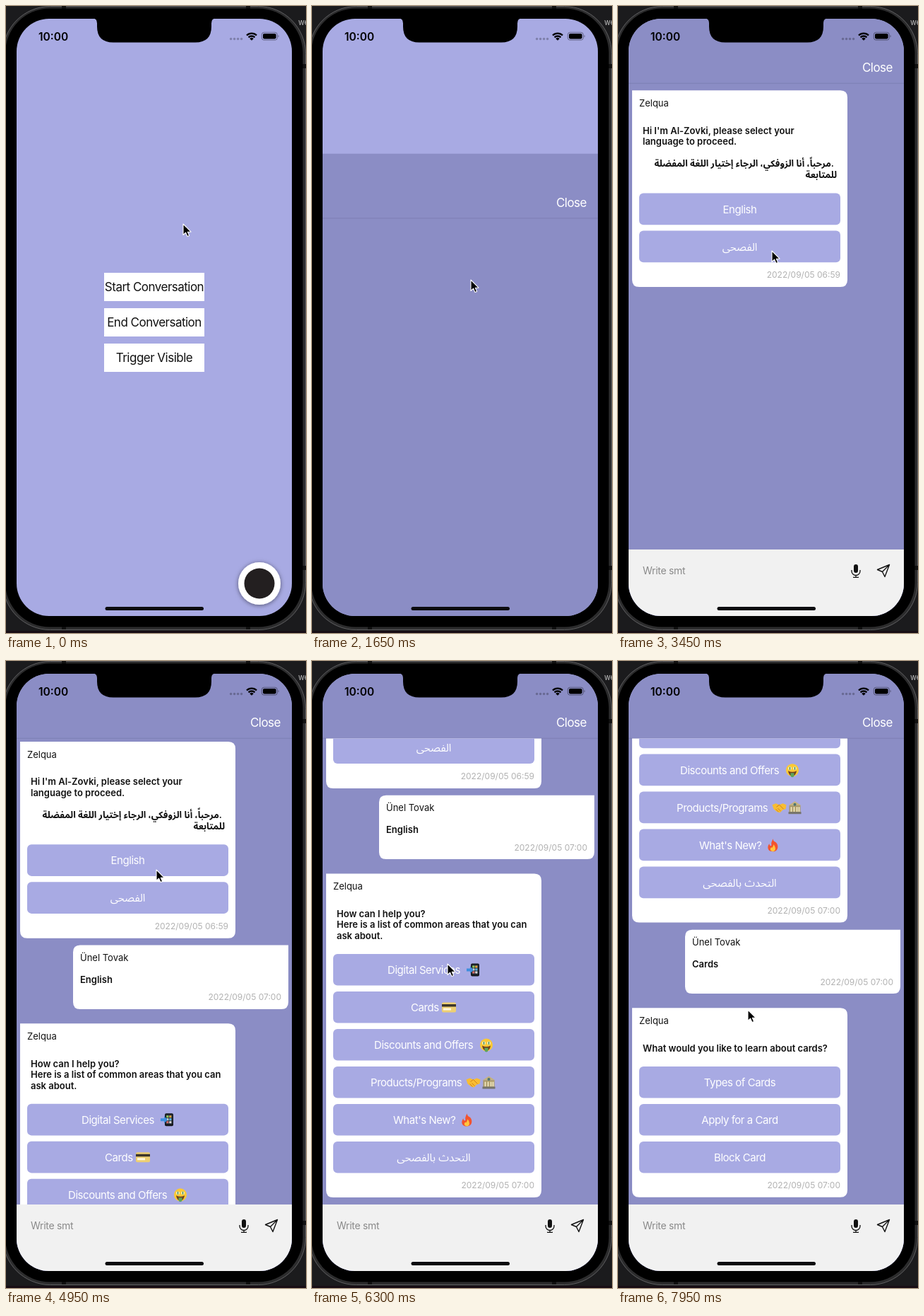
Write an HTML page that moves like this. It is 425 px wide and 886 px high and loops after 8000 ms.

```html
<!DOCTYPE html>
<html lang="en">
<head>
<meta charset="utf-8">
<title>Chat demo</title>
<style>
html, body { margin: 0; width: 100%; height: 100%; overflow: hidden; background: #1b1b1d; }
svg { display: block; width: 425px; height: 886px; }
text { font-family: Inter, "Noto Sans Arabic", "DejaVu Sans", sans-serif; white-space: pre; }
</style>
</head>
<body>
<svg id="stage" viewBox="0 0 425 886"></svg>
<script>
const LILAC = '#a8aae3', DUSK = '#8b8dc5';
const BOT = 'Zelqua', USER = 'Ünel Tovak';

// y is the middle of the capitals
const text = (x, y, s, size, fill = '#111', more = '') =>
  `<text x="${x}" y="${y + size * .36}" font-size="${size}" fill="${fill}" ${more}>${s}</text>`;
const rect = (x, y, w, h, fill, r = 0, more = '') =>
  `<rect x="${x}" y="${y}" width="${w}" height="${h}" rx="${r}" fill="${fill}" ${more}/>`;
const path = (d, fill, more = '') => `<path d="${d}" fill="${fill}" ${more}/>`;
const circle = (x, y, r, fill, more = '') => `<circle cx="${x}" cy="${y}" r="${r}" fill="${fill}" ${more}/>`;
const group = (id, inner, more = '') => `<g id="${id}" ${more}>${inner}</g>`;

const MID = 'text-anchor="middle"', END = 'text-anchor="end"', BOLD = 'font-weight="600"';
const TIGHT = 'letter-spacing="-.03em"';

// Pictograms, each centred on 0,0
const icons = {
  phone: rect(-3, -9, 12, 18, '#15181c', 2) + rect(-1.5, -7, 9, 13, '#38424a') +
    [0, 1, 2, 3, 4, 5].map(i => rect(-.7 + i % 2 * 4, -6 + (i >> 1) * 4, 3, 3,
      ['#8fce5a', '#e8a33c', '#d9d9d9', '#58b5e8', '#d86a67', '#d9d9d9'][i], .7)).join('') +
    path('M-9-2h5v-3l5 5-5 5v-3h-5z', '#3e8ede'),
  card: rect(-10, -7, 20, 14, '#edcf72', 2) + rect(-10, -4.5, 20, 3.5, '#3b3529') +
    rect(-8, 1, 11, 3, '#fff8dc'),
  face: circle(0, 0, 9, '#fbc935') + path('M-6 1Q0 4 6 1Q5 8 0 8T-6 1', '#71401b') +
    path('M-2.5 4h5v3q0 3-2.5 3t-2.5-3z', '#5da35a') +
    circle(-3.5, -2.5, 2.4, '#e9f1d4') + circle(3.5, -2.5, 2.4, '#e9f1d4') +
    path('M-3.5-4.5v4M3.5-4.5v4', 'none', 'stroke="#4c8b43" stroke-width="1.4"'),
  shake: path('M-10-4L-5-6 0-4 5-6 10-4 9 2 5 3 1 7-3 6-8 2z', '#f8bd32') +
    path('M-4-1L0-4 6 2M-5 2l4 4M-2 1l4 4', 'none', 'stroke="#cf7d1c"'),
  bank: path('M-9-3L0-9 9-3z', '#c5b27f') + rect(-8, -3, 16, 11, '#a99865') +
    [-6, -2, 2, 5].map(x => rect(x, -1, 2, 7, '#ece2bd')).join('') +
    rect(-9, 6, 18, 3, '#75736b') + circle(0, -4.5, 2, '#4e7772'),
  fire: path('M0-9C1-4 4-5 5-3C8 0 8 9 0 9C-9 9-8 1-5-2C-5 1-3 2-2 0C-3-4-1-6 0-9z', '#f3532d') +
    path('M1-1C4 3 5 8 0 9C-5 8-4 4-2 3C-1 5 0 2 1-1z', '#ffc53d'),
};
const icon = (name, x, y) => `<g transform="translate(${x} ${y})">${icons[name]}</g>`;

// A button is [label, left edge of label or none when centred, [icon, x]...]
const button = (y, [label, x, ...pics]) =>
  rect(30, y, 285, 44.7, LILAC, 6) +
  text(x || 172.5, y + 22.6, label, 15, '#fff', x ? TIGHT : /[a-z]/.test(label) ? `${TIGHT} ${MID}` : MID) +
  pics.map(([name, px]) => icon(name, px, y + 22.6)).join('');

const dateLabel = (x, y, s) => text(x, y, s, 12, '#b1b1b1', END);
const lines = (x, y, list) => list.map((s, i) => text(x, y + i * 15.5, s, 13, '#111', BOLD)).join('');

function botMessage(id, top, bottom, body, buttonsTop, buttons, time) {
  return group(id,
    path(`M20 ${top}H315q10 0 10 10V${bottom - 10}q0 10-10 10H30q-10 0-10-10z`, '#fff') +
    text(30, top + 18, BOT, 13) + lines(35, top + 56.7, body) +
    buttons.map((b, i) => button(buttonsTop + i * 53, b)).join('') +
    dateLabel(315, bottom - 17, time));
}

function userMessage(id, top, body) {
  return group(id,
    path(`M105 ${top}H400v80.3q0 10-10 10H105q-10 0-10-10V${top + 10}q0-10 10-10z`, '#fff') +
    text(105, top + 18, USER, 13) + lines(105, top + 48.5, [body]) +
    dateLabel(390, top + 73.4, '2022/09/05 07:00'));
}

const messages =
  botMessage('m0', 119.3, 397, ["Hi I'm Al-Zovki, please select your", 'language to proceed.'],
    264.5, [['English'], ['الفصحى']], '2022/09/05 06:59') +
  userMessage('m1', 406.9, 'English') +
  botMessage('m2', 517.5, 975,
    ['How can I help you?', 'Here is a list of common areas that you can', 'ask about.'], 631, [
      ['Digital Services', 107, ['phone', 228]],
      ['Cards', 140, ['card', 194]],
      ['Discounts and Offers', 88, ['face', 247]],
      ['Products/Programs', 83, ['shake', 228.5], ['bank', 250.5]],
      ["What's New?", 115, ['fire', 219.5]],
      ['التحدث بالفصحى'],
    ], '2022/09/05 07:00') +
  userMessage('m3', 985.2, 'Cards') +
  botMessage('m4', 1095.7, 1363.2, ['What would you like to learn about cards?'],
    1178.3, [['Types of Cards'], ['Apply for a Card'], ['Block Card']], '2022/09/05 07:00');

const arabic = text(306, 222.7, 'مرحباً، أنا الزوفكي، الرجاء إختيار اللغة المفضلة.', 13, '#111', `${BOLD} ${END}`) +
  text(310, 238.2, 'للمتابعة', 13, '#111', `${BOLD} ${END}`);

const home = rect(15, 18, 390, 844, LILAC) +
  ['Start Conversation', 'End Conversation', 'Trigger Visible'].map((s, i) =>
    rect(139, 377 + i * 50, 142, 40, '#fff') + text(210, 397 + i * 50, s, 17, '#111', `${MID} ${TIGHT}`)).join('') +
  circle(359, 816, 30, '#fff', 'filter="url(#shadow)"') + circle(359, 816, 21.5, '#231f20');

const inputBar = rect(15, 768, 390, 96, '#f1f1f1') +
  text(35, 798, 'Write smt', 14, '#8a8a8a', 'letter-spacing="-.02em"') +
  rect(334, 789, 6, 12, '#111', 3) +
  path('M331 797v1.5a6 6 0 0 0 12 0V797M337 804.5v3M333 807.3h8', 'none', 'stroke="#111" stroke-width="1.3"') +
  path('M384.5 789.5L367.5 796.5 374.5 799.5 378 806.5zM384.5 789.5L374.5 799.5', 'none',
    'stroke="#111" stroke-width="1.4" stroke-linejoin="round"');

const chat = rect(15, 18, 390, 844, DUSK) +
  text(389, 87, 'Close', 17, '#fff', `${END} ${TIGHT}`) +
  rect(15, 108.7, 390, 1, '#7d7fb4') +
  `<g clip-path="url(#list)">${group('scroller', messages)}</g>` + inputBar;

const statusBar =
  text(46, 43, '10:00', 15.5, '#000', BOLD) +
  [318.6, 323.6, 328.6, 333.6].map(x => circle(x, 46.5, 1.7, '#000', 'opacity=".25"')).join('') +
  path('M341 41.5a10 10 0 0 1 14 0M343.6 44.3a6.2 6.2 0 0 1 8.8 0', 'none', 'stroke="#000" stroke-width="2.4"') +
  path('M345.3 46.2a3.8 3.8 0 0 1 5.4 0L348 48.8z', '#000') +
  rect(362.3, 37.3, 22, 10.8, 'none', 3.2, 'stroke="#000" stroke-opacity=".4"') +
  rect(364, 39, 18.6, 7.4, '#000', 1.8) + path('M385.6 41q2 1.7 0 3.5z', '#000', 'opacity=".45"');

const bezel = text(414, 23, 'we', 11, '#bdbdbd') +
  rect(0, 883, 425, 3, '#180d14') +
  rect(-4.5, .5, 429, 881, '#2c2c2d', 67, 'stroke="#5e5e60"') +
  [82, 791].map(y => rect(420, y, 5, 6, '#111')).join('') +
  [79, 340].map(x => rect(x, 0, 6, 4, '#111') + rect(x, 877, 6, 4, '#111')).join('') +
  rect(-1, 3.5, 421.5, 874, '#000', 63);

const $ = id => document.getElementById(id);
$('stage').innerHTML = `<defs>
  <clipPath id="screen">${rect(15, 18, 390, 844, '#000', 46)}</clipPath>
  <clipPath id="list">${rect(15, 109.5, 390, 658.5, '#000')}</clipPath>
  <filter id="shadow" x="-30%" y="-30%" width="160%" height="160%">
    <feDropShadow dx="0" dy="1" stdDeviation="3" flood-opacity=".5"/></filter>
</defs>` + bezel +
  `<g clip-path="url(#screen)">${home}${group('chat', chat)}</g>` +
  path('M123 17.5q6 0 6 7V29q0 22.5 23 22.5H268q23 0 23-22.5V24.5q0-7 6-7z', '#000') +
  statusBar + rect(140.5, 849, 139.5, 5, '#0c0c0f', 2.5) +
  group('cursor', path('M0 0V15.5L3.6 12.2 6 17.6 8.6 16.4 6.3 11.2H11z', '#000',
    'stroke="#fff" stroke-width="1.1" stroke-linejoin="round"'));
$('m0').innerHTML += arabic;

const LOOP = 8000, STEP = 150;
const appear = [2100, 4350, 4950, 7350, 7650];
const scrolls = [[4922, 217.1], [7213.7, 105], [7622, 283.3]];
const mouse = [[0, 251, 308], [300, 251, 308], [1200, 225, 387], [3300, 225, 387], [3450, 218, 346],
  [3900, 213, 295], [5700, 213, 295], [6300, 192, 428], [6600, 192, 428], [6750, 180, 470],
  [6900, 184, 489], [7200, 184, 489], [7350, 184, 496], [7500, 184, 493], [8000, 184, 493]];

const ease = x => (x = Math.max(0, Math.min(1, x)), x * x * (3 - 2 * x));
const move = (el, x, y) => el.setAttribute('transform', `translate(${x} ${y})`);

// Critically damped spring
function sheetOffset(t) {
  if (t < 1500) return 844;
  if (t >= 2100) return 0;
  const k = 18.26 * (t - 1495) / 1000;
  return 844 * Math.exp(-k) * (1 + k);
}

function draw(now) {
  const t = Math.floor(now % LOOP / STEP) * STEP;
  move($('chat'), 0, sheetOffset(t));
  appear.forEach((from, i) => $('m' + i).style.display = t < from ? 'none' : '');
  move($('scroller'), 0, -scrolls.reduce((sum, [from, by]) => sum + by * ease((t - from) / 300), 0));
  const i = mouse.findIndex(m => m[0] > t);
  const [t0, x0, y0] = mouse[i - 1], [t1, x1, y1] = mouse[i];
  const p = ease((t - t0) / (t1 - t0));
  move($('cursor'), x0 + (x1 - x0) * p, y0 + (y1 - y0) * p);
}

const start = performance.now();
(function tick() {
  draw(performance.now() - start);
  requestAnimationFrame(tick);
})();
</script>
</body>
</html>
```
